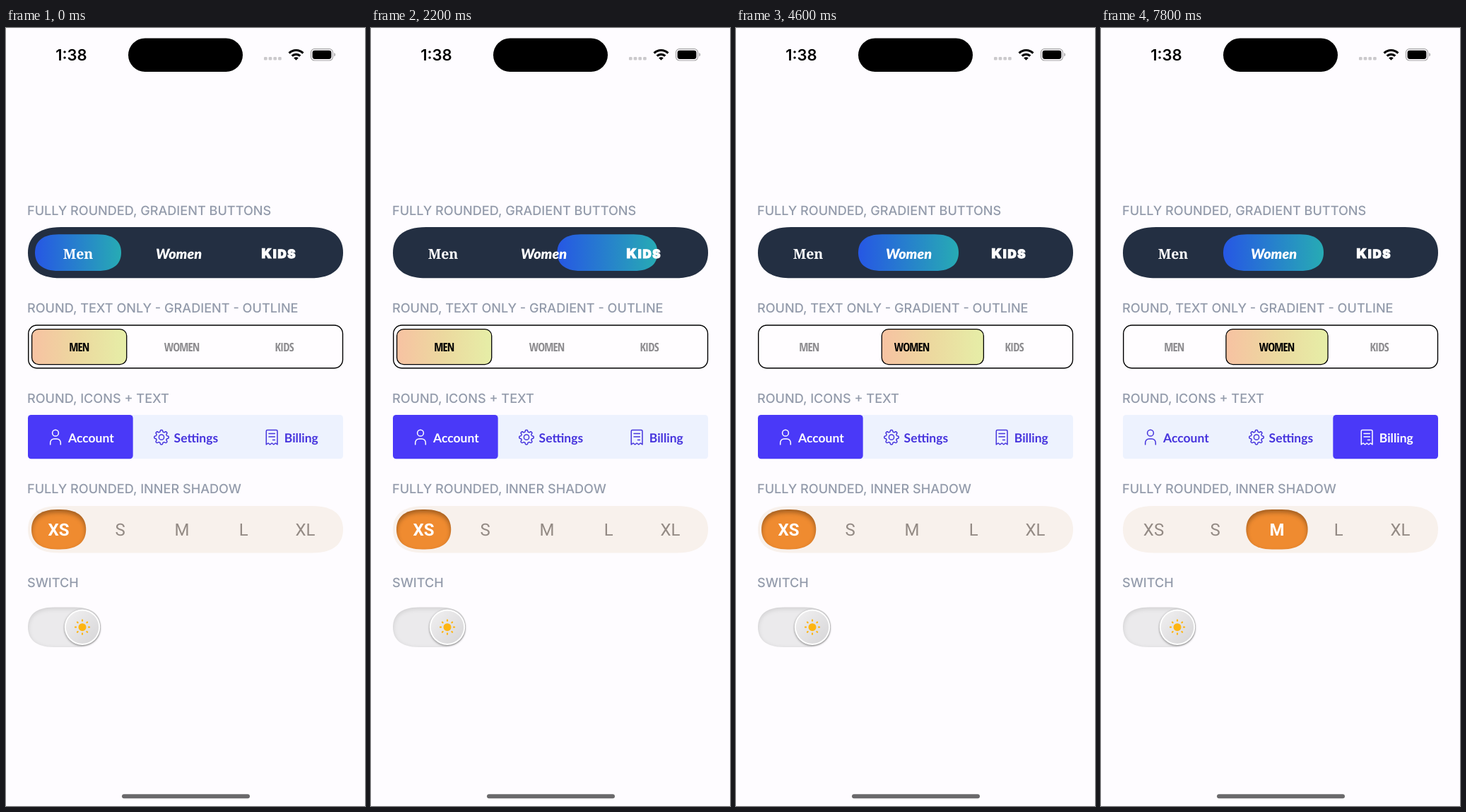
Write an HTML page that moves like this. It is 508 by 1102 pixels and loops after 8000 ms.

```html
<!DOCTYPE html>
<html lang="en">
<head>
<meta charset="utf-8">
<title>Segmented controls</title>
<style>
html, body { margin: 0; width: 100%; height: 100%; overflow: hidden; background: #fefcff; }
svg { display: block; width: 100vw; height: 100vh; }
text { text-rendering: geometricPrecision; }
.head { font: 500 18.12px Inter, sans-serif; fill: #939bab; }
.clock { font: 600 22px Inter, sans-serif; text-anchor: middle; }
#row0 text { fill: #fff; text-anchor: middle; }
.serif { font: 600 19.5px "Noto Serif", serif; }
.script { font: italic 900 19.8px Lato, sans-serif; }
.fat { font: 900 19px Inter, sans-serif; letter-spacing: 1.7px; stroke: #fff; stroke-width: 1px; }
.fat tspan { font-size: 17px; }
#row1 text {
  font: 700 16.8px "Open Sans Condensed", "Roboto Condensed", "Liberation Sans Narrow", "Open Sans", sans-serif;
  font-stretch: 75%; letter-spacing: -.9px; text-anchor: middle; fill: #8d8c8f;
}
#row1 .on { fill: #000; }
#row2 text { font: 700 17.5px Lato, sans-serif; fill: currentColor; }
#row2 .item { color: #4634dd; }
#row2 .item.on { color: #fff; }
.icon { fill: none; stroke: currentColor; stroke-width: 1.5; stroke-linecap: round; stroke-linejoin: round; }
#row3 text { font: 400 24px Roboto, sans-serif; fill: #938a84; text-anchor: middle; }
#row3 .on { font-weight: 700; fill: #fff; }
</style>
</head>
<body>
<svg viewBox="0 0 508 1102">
  <defs>
    <linearGradient id="sea"><stop stop-color="#2657e4"/><stop offset="1" stop-color="#27abb4"/></linearGradient>
    <linearGradient id="peach"><stop stop-color="#f7c2a2"/><stop offset=".5" stop-color="#ecd99f"/><stop offset="1" stop-color="#e6eea7"/></linearGradient>
    <linearGradient id="knob" x2="1" y2="1"><stop stop-color="#f1f0f1"/><stop offset="1" stop-color="#d6d5d7"/></linearGradient>
    <filter id="inset" x="-20%" y="-30%" width="140%" height="160%" color-interpolation-filters="sRGB">
      <feFlood flood-color="#000" flood-opacity=".32"/>
      <feComposite in2="SourceAlpha" operator="out"/>
      <feGaussianBlur stdDeviation="3.4"/>
      <feOffset dy="3.5"/>
      <feComposite in2="SourceAlpha" operator="in" result="shade"/>
      <feMerge><feMergeNode in="SourceGraphic"/><feMergeNode in="shade"/></feMerge>
    </filter>
    <filter id="soft" x="-20%" y="-30%" width="140%" height="160%" color-interpolation-filters="sRGB">
      <feFlood flood-color="#000" flood-opacity=".12"/>
      <feComposite in2="SourceAlpha" operator="out"/>
      <feGaussianBlur stdDeviation="3"/>
      <feOffset dy="2"/>
      <feComposite in2="SourceAlpha" operator="in" result="shade"/>
      <feMerge><feMergeNode in="SourceGraphic"/><feMergeNode in="shade"/></feMerge>
    </filter>
    <filter id="drop" x="-30%" y="-30%" width="160%" height="160%" color-interpolation-filters="sRGB">
      <feDropShadow dx="0" dy="1" stdDeviation="1.6" flood-color="#000" flood-opacity=".45"/>
    </filter>
  </defs>

  <text class="clock" x="92.5" y="46">1:38</text>
  <rect x="173" y="14.5" width="162" height="47.5" rx="23.75"/>
  <g fill="#cbc9cc">
    <rect x="365" y="41" width="4.6" height="4.6" rx="1.3"/>
    <rect x="371.7" y="41" width="4.6" height="4.6" rx="1.3"/>
    <rect x="378.4" y="41" width="4.6" height="4.6" rx="1.3"/>
    <rect x="385.1" y="41" width="4.6" height="4.6" rx="1.3"/>
  </g>
  <g fill="none" stroke="#000" stroke-width="3.2">
    <path d="M400.6 35.6a14 14 0 0 1 19.8 0"/>
    <path d="M404.7 39.7a8.2 8.2 0 0 1 11.6 0"/>
  </g>
  <path d="M410.5 45.8l-3.3-3.3a4.7 4.7 0 0 1 6.6 0z"/>
  <rect x="431.5" y="29.6" width="31" height="16.4" rx="5" fill="none" stroke="#a5a4a6" stroke-width="1.2"/>
  <rect x="433.6" y="31.7" width="26.8" height="12.2" rx="3.4"/>
  <path d="M464.3 35v5.6q1.8-.8 1.8-2.8t-1.8-2.8z" fill="#a5a4a6"/>

  <g class="head">
    <text x="30" y="264.5">FULLY ROUNDED, GRADIENT BUTTONS</text>
    <text x="30" y="402.7">ROUND, TEXT ONLY - GRADIENT - OUTLINE</text>
    <text x="30" y="530.7">ROUND, ICONS + TEXT</text>
    <text x="30" y="658.7">FULLY ROUNDED, INNER SHADOW</text>
    <text x="30" y="792.2">SWITCH</text>
  </g>

  <g id="row0">
    <path class="track" fill="#232f42"/>
    <path class="pill" fill="url(#sea)"/>
    <text class="item serif" x="102" y="326.5">Men</text>
    <text class="item script" x="244.5" y="327">Women</text>
    <text class="item fat" x="386.5" y="326">K<tspan>IDS</tspan></text>
  </g>

  <g id="row1">
    <rect x="31.7" y="421" width="444.8" height="60.8" rx="12" fill="#fffdff" stroke="#000" stroke-width="1.4"/>
    <rect class="pill" y="426.6" height="50" rx="9.5" fill="url(#peach)" stroke="#000" stroke-width="1.3"/>
    <text class="item" x="103.2" y="458">MEN</text>
    <text class="item" x="248.6" y="458">WOMEN</text>
    <text class="item" x="393.6" y="458">KIDS</text>
  </g>

  <g id="row2">
    <rect x="31" y="548" width="446" height="62.2" rx="4.5" fill="#edf2fe"/>
    <rect class="pill" y="548" height="62.2" rx="4.5" fill="#4a39f8"/>
    <g class="item">
      <g class="icon"><circle cx="70" cy="573.7" r="4.4"/><path d="M62.7 590v-2.6a5.4 5.4 0 0 1 5.4-5.4h3.8a5.4 5.4 0 0 1 5.4 5.4v2.6"/></g>
      <text x="88" y="586.8">Account</text>
    </g>
    <g class="item">
      <g class="icon"><path id="gear"/><circle cx="220" cy="579.7" r="3.6"/></g>
      <text x="237.6" y="586.8">Settings</text>
    </g>
    <g class="item">
      <g class="icon"><path d="M368.3 590v-19q0-1.5 1.5-1.5h12.7q1.5 0 1.5 1.5v19l-2.6-2-2.6 2-2.6-2-2.6 2-2.6-2zM372 574.5h8.4M372 579h8.4M377.5 583.4h2.9"/></g>
      <text x="393.8" y="586.8">Billing</text>
    </g>
  </g>

  <g id="row3">
    <path class="track" fill="#f8f1ec"/>
    <path class="pill" fill="#ef8b30" filter="url(#inset)"/>
    <text class="item" x="74.5" y="718.7">XS</text>
    <text class="item" x="161.7" y="718.7">S</text>
    <text class="item" x="249" y="718.7">M</text>
    <text class="item" x="336.3" y="718.7">L</text>
    <text class="item" x="423.4" y="718.7">XL</text>
  </g>

  <path id="switch" fill="#ebeaec" filter="url(#soft)"/>
  <circle cx="108" cy="848.7" r="25.2" fill="#fff" filter="url(#drop)"/>
  <circle cx="108" cy="848.7" r="23.2" fill="url(#knob)"/>
  <circle cx="108" cy="848.7" r="5.5" fill="#fdb512"/>
  <path id="rays" stroke="#fdb512" stroke-width="2.2" stroke-linecap="round"/>

  <rect x="164" y="1085.3" width="181" height="6" rx="3" fill="#6a696b"/>
</svg>
<script>
const LOOP = 8000, STEP = 100, LEFT = 31, WIDTH = 446;
const $ = s => document.querySelector(s);
const mix = (a, b, p) => a + (b - a) * p;

// Capsule with continuous corners
function capsule(l, r, top, bottom) {
  const R = (bottom - top) / 2, e = Math.min(1.3 * R, (r - l) / 2), mid = top + R;
  const a = .36 * R, b = .43 * R;
  return `M${l + e} ${top}H${r - e}C${r - a} ${top} ${r} ${top + b} ${r} ${mid}` +
    `C${r} ${bottom - b} ${r - a} ${bottom} ${r - e} ${bottom}H${l + e}` +
    `C${l + a} ${bottom} ${l} ${bottom - b} ${l} ${mid}` +
    `C${l} ${top + b} ${l + a} ${top} ${l + e} ${top}Z`;
}

const ease = [.12, .55, .92, 1];

// Each move: start, next index, progress of the left edge, of the right edge
const rows = [
  { pad: 10, y: [292.3, 344], track: [282, 354.3], moves: [
    [500, 1, ease], [1300, 2, [.14, .6, .93, 1], [.23, .66, .95, 1]], [2100, 1, [.06, .405, .88, 1]]] },
  { pad: 5, inset: .6, moves: [
    [3000, 1, ease], [3700, 2, [0, .15, .58, .93, 1]], [4600, 1, [.805, .94, .985, 1]]] },
  { pad: 0, moves: [[5400, 1, ease], [6000, 2, ease]] },
  { pad: 5, y: [682, 738.5], track: [677, 743.5], moves: [[7000, 1, ease], [7500, 2, ease]] }
];

rows.forEach((row, i) => {
  const g = $("#row" + i);
  row.pill = g.querySelector(".pill");
  row.items = [...g.querySelectorAll(".item")];
  if (row.track) g.querySelector(".track").setAttribute("d", capsule(LEFT, LEFT + WIDTH, ...row.track));
});

function rest({ pad, items }, i) {
  const cell = (WIDTH - 2 * pad) / items.length, l = LEFT + i * cell;
  if (i === 0) return [l + pad, l + cell - pad];
  return i === items.length - 1 ? [l + pad, l + cell + pad] : [l, l + cell];
}

function pose(row, t) {
  let at = 0, edges = rest(row, 0);
  for (const [start, next, left, right = left] of row.moves) {
    const k = Math.min(Math.floor((t - start) / STEP), left.length - 1);
    if (k < 0) break;
    const to = rest(row, next);
    edges = [mix(edges[0], to[0], left[k]), mix(edges[1], to[1], right[k])];
    if (left[k] > .1) at = next;
  }
  return { at, edges };
}

function draw(t) {
  for (const row of rows) {
    const { at, edges: [l, r] } = pose(row, t), inset = row.inset || 0;
    if (row.y) row.pill.setAttribute("d", capsule(l, r, ...row.y));
    else {
      row.pill.setAttribute("x", l + inset);
      row.pill.setAttribute("width", r - l - 2 * inset);
    }
    row.items.forEach((el, i) => el.classList.toggle("on", i === at));
  }
}

const polar = (cx, cy, r, a) => `${(cx + r * Math.cos(a)).toFixed(2)} ${(cy + r * Math.sin(a)).toFixed(2)}`;

let gear = "";
for (let i = 0; i < 96; i++) {
  const a = i * Math.PI / 48;
  gear += (i ? "L" : "M") + polar(220, 579.7, 9 + 1.3 * Math.tanh(2 * Math.cos(8 * a)), a);
}
$("#gear").setAttribute("d", gear + "Z");

let rays = "";
for (let i = 0; i < 8; i++) {
  const a = i * Math.PI / 4;
  rays += "M" + polar(108, 848.7, 9, a) + "L" + polar(108, 848.7, 10, a);
}
$("#rays").setAttribute("d", rays);
$("#switch").setAttribute("d", capsule(LEFT, 134, 820.5, 877));

const begin = performance.now();
function frame(now) {
  draw(Math.max(0, now - begin) % LOOP);
  requestAnimationFrame(frame);
}
draw(0);
requestAnimationFrame(frame);
</script>
</body>
</html>
```
